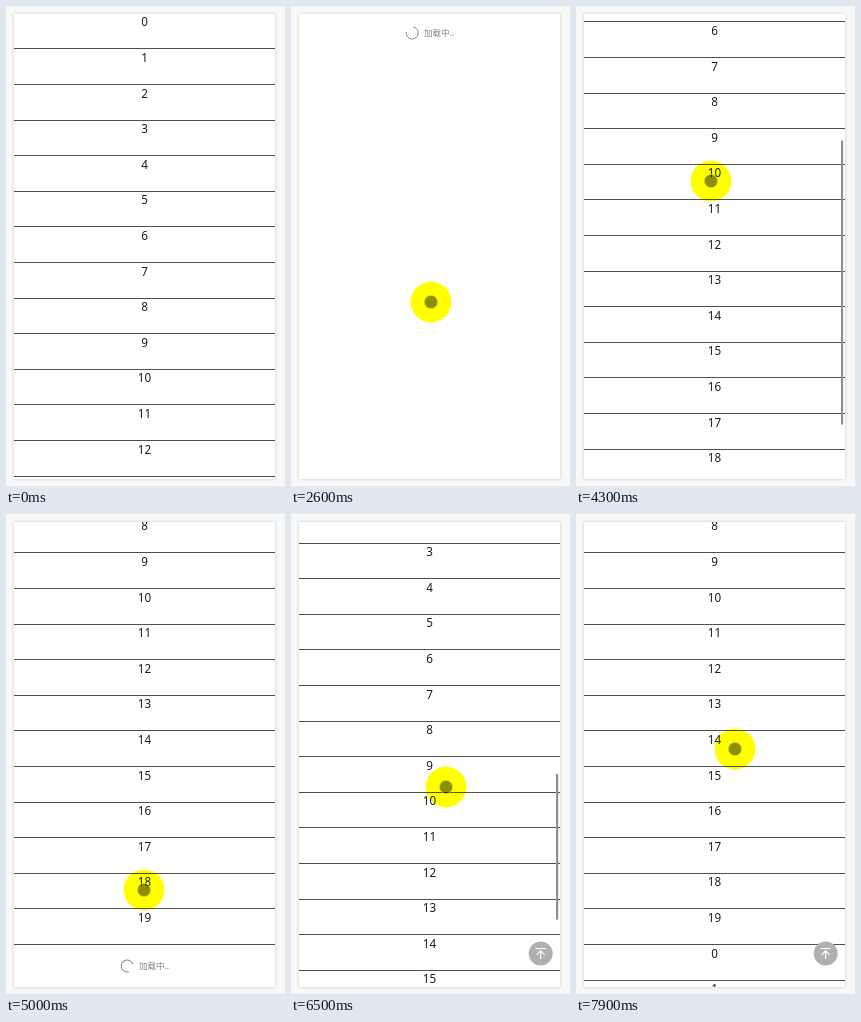
Recreate the animation shown at these times as an HTML page. Size 279 by 480 pixels, loop 8000 ms.

```html
<!DOCTYPE html>
<html lang="zh">
<head>
<meta charset="utf-8">
<title>Pull to refresh list</title>
<style>
html, body { margin: 0; width: 100%; height: 100%; overflow: hidden; background: #f8f8f8; }
svg { display: block; width: 100vw; height: 100vh; }
.panel { fill: #fff; filter: drop-shadow(0 0 1.5px rgba(0,0,0,.2)); }
.row { font: 11.7px "Noto Sans", "Open Sans", sans-serif; fill: #1c1c1c; text-anchor: middle; }
.tip { font: 8.5px "Noto Sans CJK SC", "Noto Sans CJK", sans-serif; fill: #808080; }
.ring { fill: none; stroke: #858585; stroke-width: .9; }
.halo { mix-blend-mode: multiply; }
</style>
</head>
<body>
<svg viewBox="0 0 279 480" preserveAspectRatio="none">
  <defs><clipPath id="view"><rect x="8" y="8" width="261" height="465"/></clipPath></defs>
  <rect width="279" height="480" fill="#f8f8f8"/>
  <rect class="panel" x="8" y="8" width="261" height="465"/>
  <g clip-path="url(#view)">
    <g id="rows"></g>
    <g id="head"></g>
    <g id="foot"></g>
    <rect id="thumb" x="265" width="2.2" rx="1.1" fill="#909090"/>
    <g id="toTop" transform="translate(249.7 439.5)">
      <circle r="12" fill="#b0b0b0"/>
      <path d="M-5 -5H5M0 5.5V-2.5M-4 1.3L0 -2.7L4 1.3" fill="none" stroke="#fff" stroke-width="1.2"/>
    </g>
  </g>
  <g id="cursor">
    <circle class="halo" r="20.4" fill="#ff0"/>
    <circle r="6.6" fill="#000" fill-opacity=".44" stroke="#d6d63a" stroke-width=".8"/>
  </g>
</svg>
<script>
const LOOP = 8000, STEP = 100;
const TOP = 8, VIEW = 465, PITCH = 35.6, FOOT = 41.8, PAGE = 20;
const $ = id => document.getElementById(id);

function make(parent, tag, attrs) {
  const el = document.createElementNS("http://www.w3.org/2000/svg", tag);
  for (const k in attrs) el.setAttribute(k, attrs[k]);
  return parent.appendChild(el);
}

const rows = Array.from({ length: 15 }, () => {
  const g = make($("rows"), "g", {});
  return {
    g,
    label: make(g, "text", { class: "row", x: 138.5 }),
    line: make(g, "rect", { x: 8, width: 261, height: 1, fill: "#505050" })
  };
});

function makeLoader(g) {
  return {
    g,
    ring: make(g, "path", { class: "ring", d: "M4.24 4.24A6 6 0 1 1 4.24 -4.24" }),
    tip: make(g, "text", { class: "tip", x: 133, y: 3.3 })
  };
}
const head = makeLoader($("head")), foot = makeLoader($("foot"));

// Keys are [time, value, value...]
const cursorKeys = [
  [1800, 215, 120], [2000, 140, 130], [2400, 140, 296], [2700, 140, 296],
  [3500, 146, 372], [3900, 147, 380], [4300, 135, 175], [4500, 134, 178],
  [5000, 138, 376], [5900, 138, 376], [6200, 148, 170], [6500, 155, 273],
  [6800, 155, 373], [7200, 150, 180], [7600, 154, 333], [7900, 159, 235]
];
const scrollKeys = [
  [3900, 0], [4000, 25], [4300, 205], [4400, 288.8], [5900, 288.8],
  [6200, 495], [6500, 797], [6700, 830], [6800, 830], [7300, 1000.8]
];
const pullKeys = [[2000, 0], [2400, 60], [2500, 37], [3200, 37], [3500, 0]];
const thumbKeys = [
  [3900, 0], [4000, 1], [4500, 1], [4800, 0],
  [5800, 0], [5900, 1], [7500, 1], [7800, 0]
];
const topKeys = [[6300, 0], [6500, 1]];

const smooth = u => u * u * (3 - 2 * u);

function track(keys, t, ease = u => u) {
  if (t <= keys[0][0]) return keys[0].slice(1);
  const i = keys.findIndex(k => k[0] >= t);
  if (i < 0) return keys[keys.length - 1].slice(1);
  const a = keys[i - 1], b = keys[i];
  const u = ease((t - a[0]) / (b[0] - a[0]));
  return a.slice(1).map((v, n) => v + (b[n + 1] - v) * u);
}

function show(el, on) { el.style.display = on ? "" : "none"; }

function drawRows(scroll, pull, count, visible) {
  const first = Math.floor(scroll / PITCH);
  rows.forEach((r, i) => {
    const k = first + i, y = TOP + pull + k * PITCH - scroll;
    show(r.g, visible && k < count);
    r.label.textContent = k % PAGE;
    r.label.setAttribute("y", y + 12.3);
    r.line.setAttribute("y", Math.floor(y + PITCH - .7));
  });
}

function drawLoader(l, y, text, angle) {
  l.g.setAttribute("transform", `translate(0 ${y})`);
  l.ring.setAttribute("transform", `translate(121.2 0) rotate(${angle})`);
  l.tip.textContent = text;
}

function render(t) {
  const [scroll] = track(scrollKeys, t), [pull] = track(pullKeys, t);
  const [x, y] = track(cursorKeys, t, smooth);
  const count = PAGE * (t < 5700 ? 1 : t < 7600 ? 2 : 3);
  const loading = t >= 2500;
  const cleared = loading && t < 3200;

  drawRows(scroll, pull, count, !cleared);

  show(head.g, pull > 0);
  drawLoader(head, TOP + pull - 18,
    loading ? "加载中.." : pull < 57 ? "下拉刷新" : "释放更新",
    loading ? 235 + (t - 2600) * .6 : pull * 6);

  show(foot.g, !cleared);
  drawLoader(foot, TOP + pull + count * PITCH - scroll + 20.8, "加载中..", 30 + (t - 5000) * .6);

  const total = count * PITCH + FOOT;
  $("thumb").setAttribute("y", TOP + 1 + scroll / total * (VIEW - 4));
  $("thumb").setAttribute("height", VIEW / total * (VIEW - 4));
  $("thumb").setAttribute("opacity", track(thumbKeys, t)[0]);
  $("toTop").setAttribute("opacity", track(topKeys, t)[0]);

  show($("cursor"), t >= 1800);
  $("cursor").setAttribute("transform", `translate(${x} ${y})`);
}

const start = performance.now();
function tick() {
  const t = (performance.now() - start) % LOOP;
  render(Math.floor(t / STEP) * STEP);
  requestAnimationFrame(tick);
}
tick();
</script>
</body>
</html>
```
